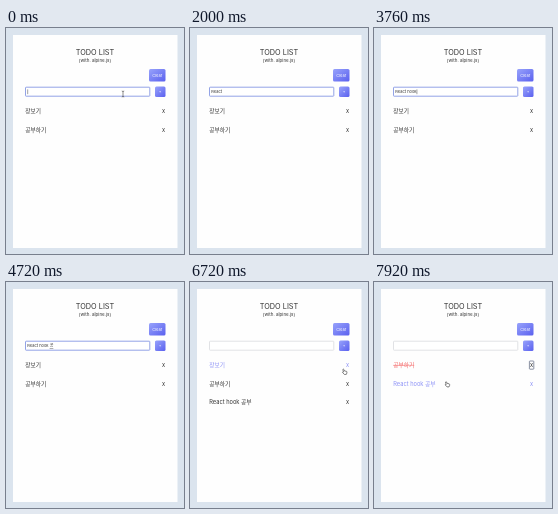
An HTML page for the animation above (8000 ms loop, 178x226 px).

```html
<!DOCTYPE html>
<html lang="ko">
<head>
<meta charset="utf-8">
<title>Todo list</title>
<style>
  html, body { margin: 0; width: 100%; height: 100%; overflow: hidden; background: #dbe4ee; }
  svg { display: block; width: 178px; height: 226px; }
  text { font: 5.7px Inter, "Noto Sans CJK KR", "Noto Sans CJK", sans-serif; fill: #333; white-space: pre; }
  .small { font-size: 4px; }
  .label { font-size: 4px; fill: #fff; text-anchor: middle; }
  .hover text { fill: #8b90f6; }
  .done text:first-child { fill: #f46a6a; text-decoration: line-through; }
</style>
</head>
<body>
<svg viewBox="0 0 178 226">
  <defs>
    <linearGradient id="violet" x2="1" y2="1">
      <stop stop-color="#98a3fb"/><stop offset="1" stop-color="#5a60ef"/>
    </linearGradient>
  </defs>
  <rect width="178" height="226" fill="#dbe4ee"/>
  <rect x="7" y="7" width="164.5" height="213" fill="#fefefe"/>
  <text x="89" y="27" text-anchor="middle" style="font-size:7.3px">TODO LIST</text>
  <text x="89" y="34.3" text-anchor="middle" style="font-size:4.5px">(with. alpine.js)</text>
  <g fill="url(#violet)">
    <rect x="143" y="41" width="16.5" height="12.5" rx="1.5"/>
    <rect x="149" y="58.5" width="10.5" height="10.5" rx="1.5"/>
  </g>
  <text class="label" x="151.2" y="48.8">Clear</text>
  <text class="label" x="154.2" y="65.2">+</text>
  <rect id="box" x="19.5" y="59.2" width="124.3" height="9" rx=".6" fill="#fff" stroke-width=".9"/>
  <text class="small" x="21.3" y="65.2"><tspan id="typed"></tspan><tspan id="composing" text-decoration="underline"></tspan></text>
  <path id="caret" stroke="#444" stroke-width=".5" d="M0 61.4v4.8"/>
  <g id="rows"></g>
  <rect id="ring" x="155.4" y="79" width="4.4" height="8.2" rx=".6" fill="none" stroke="#59647c" stroke-width=".7"/>
  <g id="pointer" stroke-linejoin="round"></g>
</svg>
<script>
const LOOP = 8000, STEP = 80;
const ADD = 5920, HOVER = 6640, REMOVE = 7040, DONE = 7440, NEXT = 7920;
const $ = id => document.getElementById(id);

// [time, committed text, syllable being composed]
const typing = [
  [0, ''], [480, 'R'], [720, 'Re'], [960, 'Rea'], [1120, 'Reac'], [1200, 'React'], [1360, 'React '],
  [2240, 'React ', 'ㅎ'], [2480, 'React ', '후'], [2720, 'React ', '훅'], [2960, 'React ', '후'],
  [3040, 'React ', 'ㅎ'], [3120, 'React '], [3360, 'React h'], [3520, 'React ho'], [3600, 'React hoo'],
  [3760, 'React hook'], [3840, 'React hook '], [4160, 'React hook ', 'ㄱ'], [4400, 'React hook ', '고'],
  [4560, 'React hook ', '공'], [4800, 'React hook 공', 'ㅂ'], [4960, 'React hook 공', '부'],
  [5040, 'React hook 공부'], [ADD, '']
];

// [time, x, y]
const path = [
  [5040, 174, 203], [5360, 168, 125], [5760, 152.5, 68.5], [ADD, 152.5, 68.5], [HOVER, 152.8, 87],
  [REMOVE, 152.8, 87], [DONE, 38, 84], [NEXT - 1, 38, 84], [NEXT, 71.5, 99.5], [LOOP, 71.5, 99.5]
];

const shapes = {
  beam: '<path d="M-1.2-3Q0-3 0-2V2Q0 3-1.2 3M1.2-3Q0-3 0-2M0 2Q0 3 1.2 3" fill="none" stroke="#444" stroke-width=".6"/>',
  arrow: '<path d="M0 0V5L1.2 4 2 6 2.9 5.6 2.1 3.7H3.7Z" fill="#111" stroke="#fff" stroke-width=".4"/>',
  hand: '<path d="M0 .5Q.7-.3 1.2.6L1.7 2 3.7 2.3Q4.3 2.6 4.1 4L3.5 5.4H1.5L-.3 3.4Q-.3 2.7 .7 3Z" fill="#fff" stroke="#333" stroke-width=".6"/>'
};

const last = (list, t) => list.filter(item => item[0] <= t).pop();

function pointerAt(t) {
  if (t < 320) return [117, 66];
  if (t < path[0][0]) return null;
  const i = path.findIndex(p => p[0] > t);
  const [t0, x0, y0] = path[i - 1], [t1, x1, y1] = path[i];
  const k = (t - t0) / (t1 - t0), e = k * k * (3 - 2 * k);
  return [x0 + (x1 - x0) * e, y0 + (y1 - y0) * e];
}

function drawField(t) {
  const [since, text, part = ''] = last(typing, t);
  const focused = t < ADD;
  $('typed').textContent = text;
  $('composing').textContent = part;
  $('box').setAttribute('stroke', focused ? '#8799e4' : '#dedfe3');
  const end = 21.5 + (text ? $('typed').getComputedTextLength() : 0);
  $('caret').setAttribute('transform', `translate(${end + .2})`);
  const visible = focused && !part && t < 5520 && (t - since) % 1000 < 500;
  $('caret').style.display = visible ? '' : 'none';
}

function drawRows(t) {
  const items = ['장보기', '공부하기'];
  if (t >= ADD) items.push('React hook 공부');
  if (t >= REMOVE) items.shift();
  const hovered = t >= NEXT ? 1 : t >= HOVER ? 0 : -1;
  $('rows').innerHTML = items.map((name, i) => {
    const done = t >= DONE && i === 0;
    const state = done ? 'done' : i === hovered ? 'hover' : '';
    const y = 85.2 + i * 18.6;
    return `<g class="${state}"><text x="19.3" y="${y}">${name}</text><text x="157.6" y="${y}" text-anchor="middle">x</text></g>`;
  }).join('');
  $('ring').style.display = t >= REMOVE ? '' : 'none';
}

function drawPointer(t) {
  const at = pointerAt(t);
  const shape = t < 320 ? 'beam' : t < HOVER ? 'arrow' : 'hand';
  $('pointer').innerHTML = at ? shapes[shape] : '';
  if (at) $('pointer').setAttribute('transform', `translate(${at})`);
}

const start = performance.now();
function frame() {
  const t = Math.floor((performance.now() - start) % LOOP / STEP) * STEP;
  drawField(t);
  drawRows(t);
  drawPointer(t);
  requestAnimationFrame(frame);
}
frame();
</script>
</body>
</html>
```
